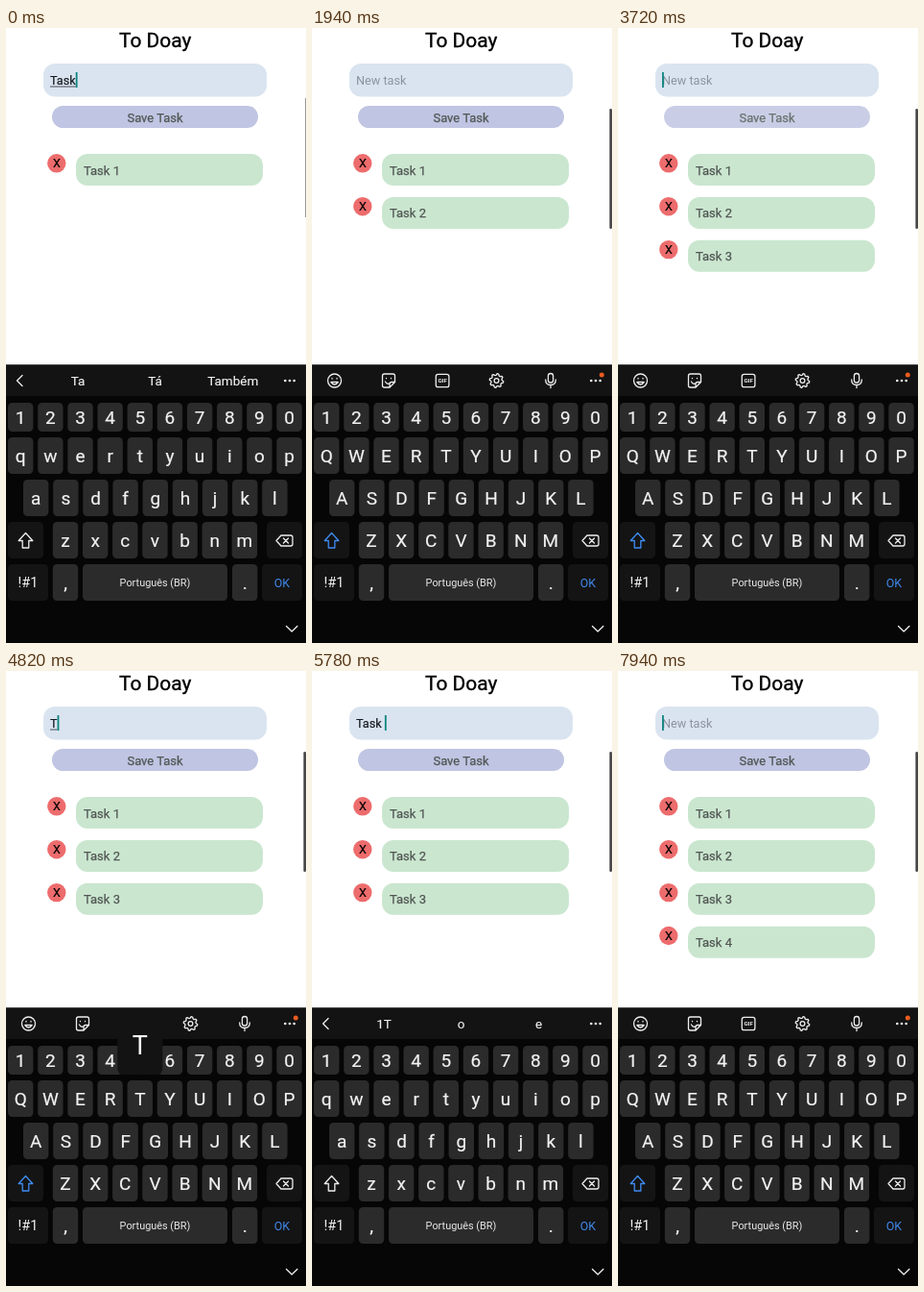
An HTML page that plays this animation: 313x640 px, repeating every 8 s.

```html
<!DOCTYPE html>
<html lang="en">
<head>
<meta charset="utf-8">
<title>Task list</title>
<style>
html, body { margin: 0; width: 100%; height: 100%; overflow: hidden; background: #fff; }
svg { display: block; width: 100%; height: 100%; font-family: Roboto, sans-serif; }
text { white-space: pre; }
.key { font-size: 19px; fill: #f2f2f2; stroke: #f2f2f2; stroke-width: .2; }
.hint { font-size: 13.5px; fill: #f2f2f2; stroke: #f2f2f2; stroke-width: .15; }
.item { font-size: 13px; fill: #505653; stroke: #505653; stroke-width: .25; }
.line { fill: none; stroke: #eee; stroke-width: 1.3; stroke-linecap: round; stroke-linejoin: round; }
</style>
</head>
<body>
<svg id="stage" viewBox="0 0 313 640"></svg>
<script>
const NS = 'http://www.w3.org/2000/svg';
const stage = document.getElementById('stage');

function add(tag, attrs, parent = stage, text) {
  const el = document.createElementNS(NS, tag);
  for (const k in attrs) el.setAttribute(k, attrs[k]);
  if (text !== undefined) el.textContent = text;
  parent.appendChild(el);
  return el;
}
const box = (x, y, width, height, rx, fill, parent) =>
  add('rect', { x, y, width, height, rx, fill }, parent);
const mid = (x, y, text, cls, parent) =>
  add('text', { x, y, class: cls, 'text-anchor': 'middle' }, parent, text);
const path = (d, parent, extra) => add('path', { d, class: 'line', ...extra }, parent);
const show = (el, on) => el.setAttribute('visibility', on ? 'visible' : 'hidden');

// Page
box(0, 0, 313, 640, 0, '#fff');
add('text', { x: 155.7, y: 19.5, 'font-size': 20.9, 'text-anchor': 'middle', stroke: '#000', 'stroke-width': .35 }, stage, 'To Doay');
box(39, 37, 233, 34.5, 12, '#dae4f0');
const holder = add('text', { x: 46, y: 59, 'font-size': 12.7, fill: '#8b939d' }, stage, 'New task');
const entry = add('text', { x: 46, y: 59, 'font-size': 12.7, fill: '#15191d', stroke: '#15191d', 'stroke-width': .2 });
const underline = box(46, 60.5, 0, 1, 0, '#4a5058');
const caret = box(46, 46, 1.8, 16, 0, '#0d857e');
const button = add('g', {});
box(48, 81, 215, 23, 11.5, '#bfc5e2', button);
mid(155.5, 97.5, 'Save Task', 'item', button);

const items = [0, 1, 2, 3].map(i => {
  const g = add('g', { transform: `translate(0 ${i * 44.9})` });
  add('circle', { cx: 52.8, cy: 140.8, r: 9.7, fill: '#ed6c6d' }, g);
  add('text', { x: 52.8, y: 145.4, 'font-size': 12.5, 'text-anchor': 'middle', stroke: '#000', 'stroke-width': .2 }, g, 'X');
  box(73, 131, 195, 33, 12, '#cae6cf', g);
  add('text', { x: 81, y: 152.5, class: 'item' }, g, 'Task ' + (i + 1));
  return g;
});
const thinBar = box(312, 73, 1, 124, 0, '#999');
const thickBar = box(310.4, 84, 2.6, 125, 1.3, '#454545');

// Keyboard
box(0, 350.5, 313, 289.5, 0, '#060606');
box(0, 350.5, 313, 32.5, 0, '#131313');
const keys = {}, letters = [];

function key(ch, x, y, w, h = 38, fill = '#2b2b2b') {
  const rect = box(x, y, w, h, 4.5, fill);
  keys[ch] = { rect, fill, x: x + w / 2, y };
}
function row(chars, x, y, h) {
  [...chars].forEach((ch, i) => {
    key(ch, x + i * 31.15, y, 26.4, h);
    const label = mid(x + i * 31.15 + 13.2, y + h / 2 + 6.7, ch, 'key');
    if (/[a-z]/.test(ch)) letters.push(label);
  });
}
row('1234567890', 2, 390, 30);
row('qwertyuiop', 2, 426, 38);
row('asdfghjkl', 18, 470, 38);
row('zxcvbnm', 48.8, 514, 38);
row(',', 48.8, 558, 38);
row('.', 236, 558, 38);
key('shift', 2, 514, 37, 38, '#141414');
key('back', 272, 514, 37, 38, '#141414');
key('sym', 2, 558, 42, 38, '#141414');
key(' ', 80, 558, 151, 38);
key('ok', 267, 558, 42, 38, '#141414');
add('text', { x: 23, y: 582, 'font-size': 14.5, fill: '#f2f2f2', 'text-anchor': 'middle' }, stage, '!#1');
add('text', { x: 155.5, y: 581.2, 'font-size': 10.9, fill: '#e8e8e8', 'text-anchor': 'middle' }, stage, 'Português (BR)');
add('text', { x: 288, y: 581.8, 'font-size': 12.5, fill: '#4088ea', 'text-anchor': 'middle' }, stage, 'OK');
const shift = path('M20.5 525.5 l7.3 8 h-4 v7.5 h-6.6 v-7.5 h-4 z');
path('M287 528 h10 q2 0 2 2 v7 q0 2-2 2 h-10 l-5-5.5 z M289.5 531 l5 5 m0-5 l-5 5');
path('M292.5 622.5 l5.7 5.5 5.7-5.5', stage, { 'stroke-width': 1.6 });

// Tool icons
const tools = add('g', {});
add('circle', { cx: 23.5, cy: 367, r: 7, class: 'line' }, tools);
path('M19.8 368.5 q3.7 5 7.4 0 z M21 364.5 v.6 M26 364.5 v.6', tools);
path('M75.5 360 h9 q2 0 2 2 v6.5 l-5.5 5.5 h-5.5 q-2 0-2-2 v-10 q0-2 2-2 z M86.5 368.5 h-3.5 q-2 0-2 2 v3.5 M76.5 368 q1.5 3 4 2 M77.5 364.3 v.4 M82.5 364.3 v.4', tools);
add('rect', { x: 129.3, y: 360.3, width: 13.6, height: 13.4, rx: 2.2, class: 'line' }, tools);
add('text', { x: 136.1, y: 369.3, 'font-size': 6.2, 'font-weight': 700, fill: '#eee', 'text-anchor': 'middle' }, tools, 'GIF');
let gear = '';
for (let i = 0; i < 32; i++) {
  const a = (i + .5) / 32 * Math.PI * 2, r = i % 4 < 2 ? 7.3 : 5.7;
  gear += `${i ? 'L' : 'M'}${192.5 + r * Math.cos(a)} ${367 + r * Math.sin(a)}`;
}
path(gear + 'Z', tools);
add('circle', { cx: 192.5, cy: 367, r: 2.4, class: 'line' }, tools);
add('rect', { x: 246.4, y: 359.5, width: 5.2, height: 9.5, rx: 2.6, class: 'line' }, tools);
path('M243.7 366 q0 5.5 5.3 5.5 t5.3-5.5 M249 371.5 v3', tools);
add('circle', { cx: 302.3, cy: 361, r: 2.5, fill: '#ea5b1f' }, tools);

const hints = add('g', {});
path('M17 361.5 l-5.5 5.5 5.5 5.5', hints);
const words = [75, 155.5, 236.7].map(x => mid(x, 371.8, '', 'hint', hints));
for (const x of [291.3, 296, 300.7]) add('circle', { cx: x, cy: 367, r: 1.35, fill: '#eee' });

const popup = add('g', {});
box(-23.5, -72, 47, 66, 6, '#131313', popup);
const popText = add('text', { x: 0, y: -27.5, 'font-size': 27, fill: '#fff', 'text-anchor': 'middle' }, popup);

// Timeline
const LOOP = 8000, HOLD = 100, PRESS = 90, FADE = 250;
const strokes = [
  [-700, 'T'], [-500, 'a'], [-300, 's'], [-110, 'k'], [160, ' '], [560, '2'],
  [2070, 'T'], [2240, 'a'], [2430, 's'], [2590, 'k'], [2830, ' '], [3130, '3'],
  [4760, 'T'], [5040, 'a'], [5300, 's'], [5520, 'k'], [5670, ' '], [6100, '4']
];
const saves = [1050, 3550, 6650];

function buttonAlpha(t) {
  for (const s of saves) {
    const d = t - s;
    if (d >= -PRESS && d < 0) return 1 - .8 * Math.min(1, (d + PRESS) / 60);
    if (d >= 0 && d < FADE) {
      const p = d / FADE;
      return .2 + .8 * (p < .5 ? 2 * p * p : 1 - 2 * (1 - p) ** 2);
    }
  }
  return 1;
}

function draw(t) {
  const saved = saves.filter(s => s <= t);
  const since = saved.length ? saved[saved.length - 1] : -Infinity;
  const typed = strokes.filter(s => s[0] <= t && s[0] > since);
  const text = typed.map(s => s[1]).join('');
  const last = typed[typed.length - 1];
  const held = last && t - last[0] < HOLD ? last[1] : null;

  items.forEach((g, i) => show(g, i <= saved.length));
  show(thinBar, !saved.length);
  show(thickBar, saved.length);
  button.setAttribute('opacity', buttonAlpha(t));

  entry.textContent = text.replace(' ', '\u00a0');
  show(holder, !text);
  const width = text ? entry.getComputedTextLength() : 0;
  caret.setAttribute('x', 46 + width);
  show(caret, (t - (last ? last[0] : since)) % 1000 < 500);
  underline.setAttribute('width', text.includes(' ') ? 0 : width);

  const upper = !text || (text === 'T' && held);
  letters.forEach(l => {
    const ch = l.textContent;
    l.textContent = upper ? ch.toUpperCase() : ch.toLowerCase();
  });
  shift.style.stroke = upper ? '#3f8cf2' : '#eee';
  show(tools, upper);
  show(hints, !upper);
  const list = text.includes(' ') ? ['1T', 'o', 'e'] : ['Ta', 'Tá', 'Também'];
  words.forEach((w, i) => { w.textContent = list[i]; });

  keys[' '].rect.setAttribute('fill', held === ' ' ? '#444' : keys[' '].fill);
  const pop = held && held !== ' ';
  show(popup, pop);
  if (pop) {
    const k = keys[held.toLowerCase()];
    popup.setAttribute('transform', `translate(${k.x} ${k.y})`);
    popText.textContent = held;
  }
}

const start = performance.now();
function tick() {
  draw((performance.now() - start) % LOOP);
  requestAnimationFrame(tick);
}
tick();
</script>
</body>
</html>
```
